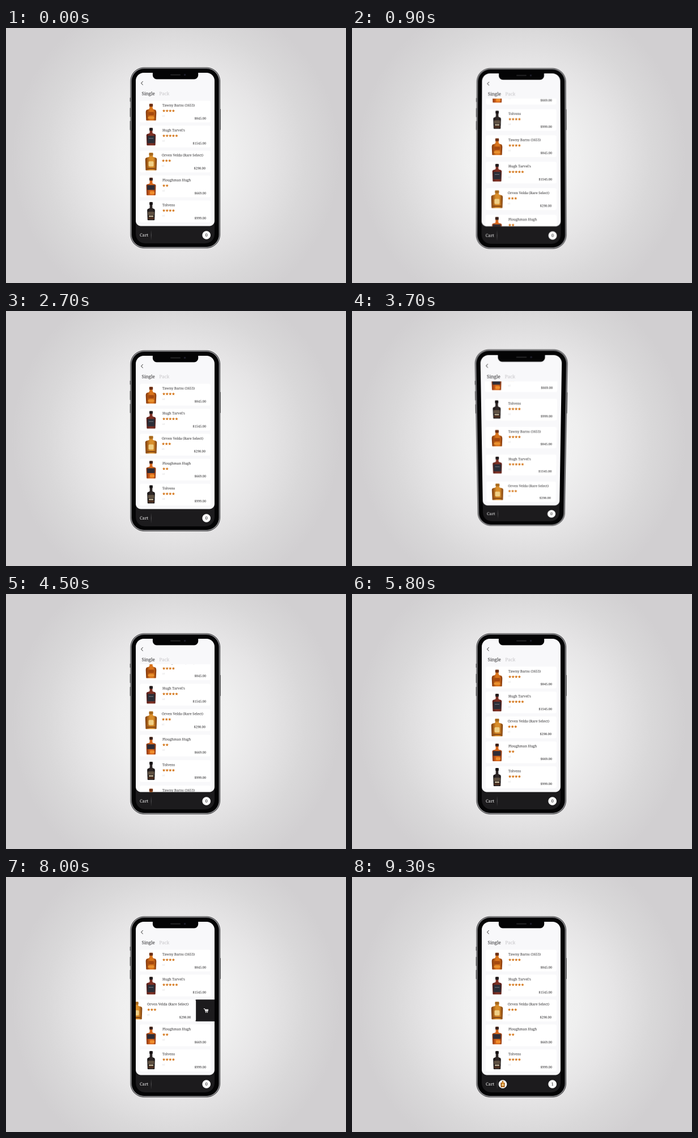
An HTML page with a canvas that plays this animation: 600x450 px, repeating every 9400 ms.

```html
<!DOCTYPE html>
<html lang="en">
<head>
<meta charset="utf-8">
<title>Bottle shop</title>
<style>
  html, body { margin: 0; width: 100%; height: 100%; overflow: hidden; }
  body { position: relative; background: radial-gradient(circle 290px at 300px 226px, #f6f6f6, #efefef 34%, #e6e5e6 56%, #d9d8d9 79%, #d1cfd1); }
  canvas { display: block; position: absolute; left: 200px; top: 50px; width: 200px; height: 360px; transform-origin: 99px 179px; }
</style>
</head>
<body>
<canvas id="phone" width="400" height="720"></canvas>
<script>
const LOOP = 9400;
const ROW = 44;
const DARK = '#1c1b1d';
const cv = document.getElementById('phone');
const c = cv.getContext('2d');

const items = [
  { name: 'Tawny Barns (1653)', stars: 4, price: '$845.00', x: 0 },
  { name: "Hugh Tarvel's", stars: 5, price: '$1545.00', x: 0 },
  { name: 'Orven Velda (Rare Select)', stars: 3, price: '$298.00', x: -1 },
  { name: 'Ploughman Hugh', stars: 2, price: '$669.00', x: 0 },
  { name: 'Tolvens', stars: 4, price: '$999.00', x: 0 }
];

// glass: edge and middle colours; neck, body: half widths; cap, top, shoulder: heights
const bottles = [
  { glass: ['#7d330b', '#d9741c'], neck: 2.6, body: 9.3, cap: 5.5, top: 11, shoulder: 21, capColor: '#6d2f14',
    parts: [['#e9922f', -5.5, 28, 11, 4, 2], ['#a5490f', -5, 20, 10, 6, 2]] },
  { glass: ['#571c17', '#7e3023'], neck: 2.4, body: 8.2, cap: 4, top: 12, shoulder: 17.5, capColor: '#221c1d',
    parts: [['#2b2d36', -6.6, 18, 13.2, 13, 1], ['#777b84', -4, 22, 8, 1, 0]] },
  { glass: ['#7a3a0c', '#d98e2b'], neck: 3, body: 10.2, cap: 4, top: 9, shoulder: 16, capColor: '#a8691c',
    parts: [['#f0cf85', -4.5, 19, 9, 9, 2], ['#8c4a14', -8, 30.5, 16, 2.5, 1]] },
  { glass: ['#8a3513', '#d8661a'], neck: 2.4, body: 8.5, cap: 4, top: 13, shoulder: 18, capColor: '#3a211b',
    parts: [['#2f2c36', -7, 17, 13.5, 8.5, 1], ['#f08e2c', -2, 28, 8, 5, 2]] },
  { glass: ['#141112', '#2e2726'], neck: 2.3, body: 6.8, cap: 3, top: 12, shoulder: 18, capColor: '#171314',
    parts: [['#5f5142', -5.5, 20, 11, 6, 1], ['#d4c4a2', -4, 27, 8, 2, 0], ['#50301f', -5.5, 30, 11, 3, 1]] }
];

// Start (ms), time constant (ms), rows travelled
const flicks = [[0, 100, 3.545], [850, 100, 3.545], [1780, 90, 2.91], [3280, 200, -5]];

const clamp = (v, a, b) => Math.min(b, Math.max(a, v));
const smooth = (t, a, b) => { const u = clamp((t - a) / (b - a), 0, 1); return u * u * (3 - 2 * u); };
const bell = (t, a, b) => Math.sin(Math.PI * clamp((t - a) / (b - a), 0, 1)) ** 2;

function scrollAt(t) {
  let pos = 0, vel = 0;
  for (const [start, tau, rows] of flicks) {
    const u = (t - start) / tau;
    if (u <= 0) continue;
    const e = Math.exp(-u);
    pos += rows * (1 - e * (1 + u + u * u / 2));
    vel += rows * e * u * u / 2 / tau * 1000;
  }
  return { pos, vel };
}

function path(x, y, w, h, r) {
  c.beginPath();
  c.roundRect(x, y, w, h, r);
}

function box(color, x, y, w, h, r) {
  path(x, y, w, h, r);
  c.fillStyle = color;
  c.fill();
}

function disc(color, x, y, r) {
  c.beginPath();
  c.arc(x, y, r, 0, 7);
  c.fillStyle = color;
  c.fill();
}

function line(color, width, ...pts) {
  c.beginPath();
  for (let i = 0; i < pts.length; i += 2) c.lineTo(pts[i], pts[i + 1]);
  c.strokeStyle = color;
  c.lineWidth = width;
  c.stroke();
}

function text(str, x, y, size, color, align = 'left') {
  c.font = `${size}px "Noto Serif", serif`;
  c.textAlign = align;
  c.fillStyle = color;
  c.fillText(str, x, y);
}

function star(x, y) {
  c.beginPath();
  for (let i = 0; i < 10; i++) {
    const a = i * Math.PI / 5 - Math.PI / 2, r = i % 2 ? 1.35 : 2.75;
    c.lineTo(x + r * Math.cos(a), y + r * Math.sin(a));
  }
  c.fillStyle = '#d67a20';
  c.fill();
}

function bottle(i, x, y, scale = 1) {
  const { glass, neck, body, cap, top, shoulder, capColor, parts } = bottles[i];
  const foot = 35;
  c.save();
  c.translate(x, y);
  c.scale(scale, scale);
  const g = c.createLinearGradient(-body, 0, body, 0);
  g.addColorStop(0, glass[0]);
  g.addColorStop(0.4, glass[1]);
  g.addColorStop(0.7, glass[1]);
  g.addColorStop(1, glass[0]);
  c.beginPath();
  c.moveTo(-neck, cap);
  c.lineTo(-neck, top);
  c.bezierCurveTo(-neck, shoulder - 2, -body, top + 1, -body, shoulder);
  c.lineTo(-body + 0.6, foot - 1);
  c.quadraticCurveTo(-body + 0.6, foot, -body + 2, foot);
  c.lineTo(body - 2, foot);
  c.quadraticCurveTo(body - 0.6, foot, body - 0.6, foot - 1);
  c.lineTo(body, shoulder);
  c.bezierCurveTo(body, top + 1, neck, shoulder - 2, neck, top);
  c.lineTo(neck, cap);
  c.fillStyle = g;
  c.fill();
  box(capColor, -neck - 0.6, cap, neck * 2 + 1.2, 5, 1);
  for (const part of parts) box(...part);
  c.restore();
}

function card(i, top, off) {
  const it = items[i], x = 276 + it.x - off;
  box('#fff', 236 - off, top, 125, 38.5, 3);
  bottle(i, 256 - off, top);
  text(it.name, x, top + 10.3, 6.05, '#222123');
  for (let n = 0; n < it.stars; n++) star(x + 2.6 + n * 5.6, top + 18);
  text('x1', x, top + 28.4, 4.2, '#d2d2d4');
  text(it.price, 353 + it.x - off, top + 33.1, 5.7, '#222123', 'right');
}

function buyButton(top, off, press) {
  const left = 368 - 1.27 * off;
  box(DARK, left - 2, top, 374 - left, 38.5, 3);
  c.save();
  c.translate(left + 18, top + 19.5);
  c.scale(1 - 0.2 * press, 1 - 0.2 * press);
  line('#fff', 0.9, -4, -3.2, -2.5, -3.2, -1, 1.5, 2.7, 1.5, 3.6, -1.8, -2, -1.8);
  box('#fff', -1.6, -1.2, 4.4, 1.8, 0);
  disc('#fff', -0.5, 3, 0.8);
  disc('#fff', 2.2, 3, 0.8);
  c.restore();
}

function drawBody() {
  for (const [x, y, h] of [[218.7, 123, 7], [218.7, 141, 16], [218.7, 164, 16], [377.4, 143, 37]])
    box('#4a4a4c', x, y, 1.3, h, 0.6);
  box('#2c2c2e', 219.4, 69.5, 158.7, 319.2, 24.5);
  box('#c6c6c9', 220.4, 70.5, 156.7, 317.2, 23.5);
  box('#3c3c3f', 221.2, 71.3, 155.1, 315.6, 22.7);
  box('#040405', 222, 72.1, 153.5, 314, 22);
}

function drawList(t, s) {
  const pitch = ROW + Math.min(7.5, Math.abs(s.vel) * 0.89);
  const off = 30 * (smooth(t, 5880, 6950) - smooth(t, 7910, 8300));
  const first = Math.floor(s.pos) - 2;
  c.save();
  c.beginPath();
  c.rect(229, 124, 139, 226);
  c.clip();
  for (let k = first; k < first + 10; k++) {
    const i = ((k % 5) + 5) % 5;
    const top = 128.2 + 2 * ROW + (k - s.pos - 2) * pitch;
    const shift = i === 2 ? off : 0;
    if (shift > 0.01) buyButton(top, shift, bell(t, 7400, 7800));
    card(i, top, shift);
  }
  c.restore();
}

function drawCart(t) {
  text('Cart', 236, 368.2, 7.6, '#f4f4f4');
  const g = c.createLinearGradient(0, 356, 0, 375);
  g.addColorStop(0, DARK);
  g.addColorStop(0.5, '#69686b');
  g.addColorStop(1, DARK);
  line(g, 0.8, 256.2, 356, 256.2, 375);
  const pop = smooth(t, 8450, 8850);
  if (pop > 0) {
    c.save();
    c.translate(266, 365.6);
    c.scale(pop, pop);
    disc('#fff', 0, 0, 7.3);
    bottle(2, 0, -7.2, 0.36);
    c.restore();
  }
  disc('#fff', 353.7, 365.5, 7.3);
  text(t < 8700 ? '0' : '1', 353.7, 368.2, 7.6, '#202022', 'center');
}

function drawScreen(t, s) {
  c.save();
  path(229, 79, 139, 301, [14, 14, 16, 16]);
  c.clip();
  c.fillStyle = DARK;
  c.fill();
  path(229, 60, 139, 289.4, 9);
  c.fillStyle = '#f8f8fa';
  c.fill();
  c.save();
  c.clip();
  drawList(t, s);
  c.restore();
  line('#444', 0.8, 241.4, 94.3, 238.5, 97.3, 241.4, 100.3);
  text('Single', 239.6, 118.4, 8, '#1f1e20');
  text('Pack', 270.4, 118.4, 8, '#c3c2c5');
  drawCart(t);
  box('#040405', 258.9, 70, 80.3, 20.4, 7.5);
  c.restore();
  box('#242426', 290, 81.6, 18, 2, 1);
  disc('#1c1c28', 315.6, 82.6, 1.7);
}

function render(t) {
  const s = scrollAt(t);
  const rx = Math.sign(s.vel) * clamp((Math.abs(s.vel) - 2) * 0.0483, 0, 0.3);
  const ry = -0.34 * bell(t, 5820, 6970) - 0.04 * bell(t, 7350, 7950);
  cv.style.transform = `perspective(1000px) rotateX(${rx.toFixed(5)}rad) rotateY(${ry.toFixed(5)}rad)`;
  c.setTransform(2, 0, 0, 2, -400, -100);
  c.clearRect(200, 50, 200, 360);
  c.lineCap = c.lineJoin = 'round';
  c.textRendering = 'geometricPrecision';
  drawBody();
  drawScreen(t, s);
}

const begin = performance.now();
function tick() {
  render((performance.now() - begin) % LOOP);
  requestAnimationFrame(tick);
}
tick();
</script>
</body>
</html>
```
